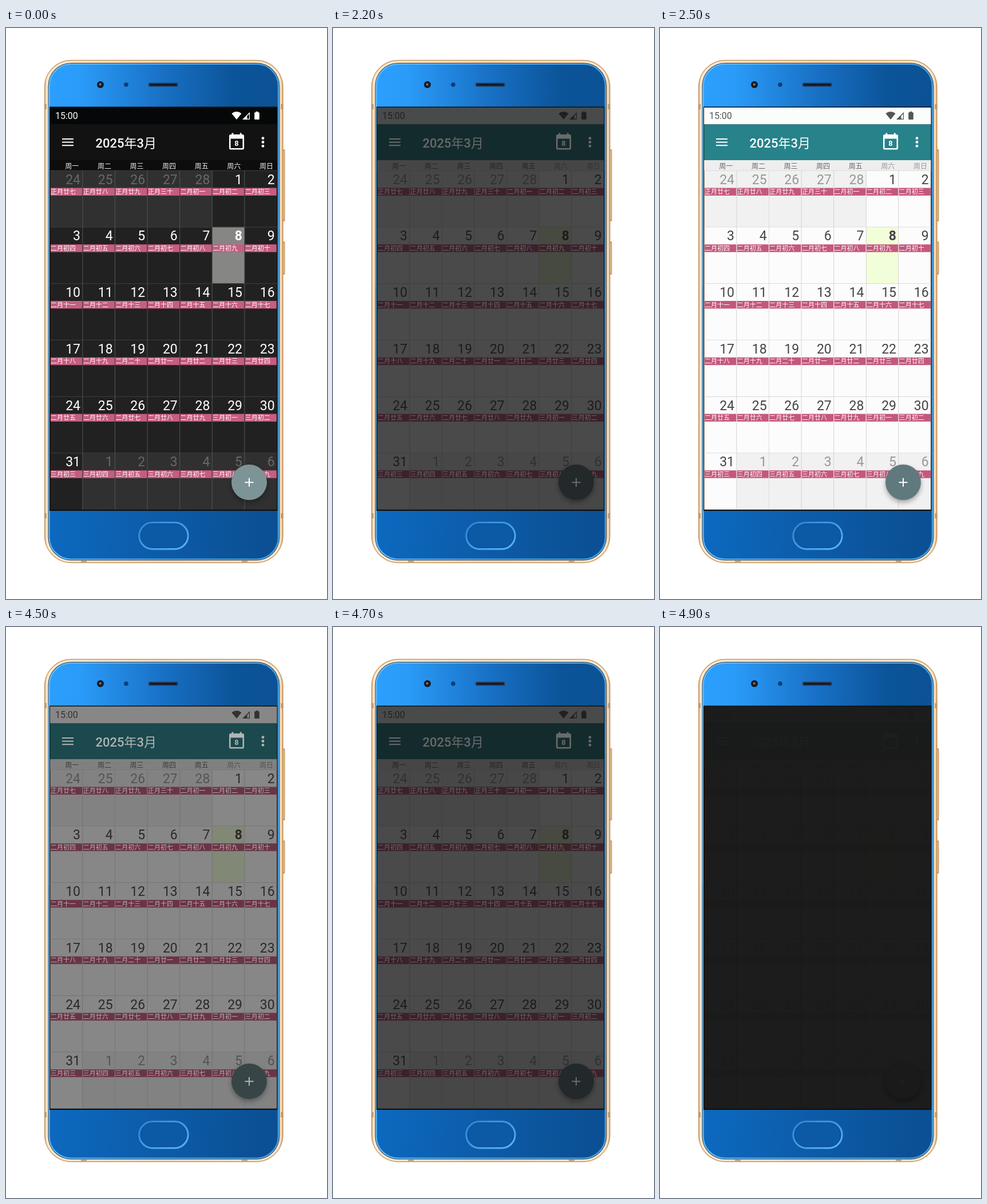
Recreate the animation shown at these times as an HTML page. Size 561x998 px, loop 5000 ms.

```html
<!DOCTYPE html>
<html lang="zh-CN">
<head>
<meta charset="utf-8">
<title>日历主题</title>
<style>
html, body { margin: 0; width: 100%; height: 100%; overflow: hidden; background: #fff; }
svg { display: block; width: 561px; height: 998px; font-family: Roboto, "Noto Sans CJK SC", "Noto Sans CJK", sans-serif; }
</style>
</head>
<body>
<svg id="stage" viewBox="0 0 561 998">
  <defs>
    <linearGradient id="gold" x1="0" x2="1">
      <stop offset="0" stop-color="#d3a46e"/><stop offset=".012" stop-color="#f6e3c6"/>
      <stop offset=".5" stop-color="#e3bd8d"/>
      <stop offset=".98" stop-color="#f3dcbb"/><stop offset="1" stop-color="#cfa06c"/>
    </linearGradient>
    <linearGradient id="top" x1="0" x2="1">
      <stop offset="0" stop-color="#2c9fff"/><stop offset=".14" stop-color="#2a9bf8"/>
      <stop offset=".5" stop-color="#1870c4"/><stop offset=".8" stop-color="#0b5499"/>
      <stop offset="1" stop-color="#0c5194"/>
    </linearGradient>
    <linearGradient id="chin" x1="0" x2="1" y1="0" y2=".1">
      <stop offset="0" stop-color="#0c6cc4"/><stop offset=".5" stop-color="#0d5dab"/>
      <stop offset="1" stop-color="#0b5094"/>
    </linearGradient>
    <linearGradient id="rim" x1="0" x2="1">
      <stop offset="0" stop-color="#68c0ff"/><stop offset=".5" stop-color="#52b0f5"/>
      <stop offset="1" stop-color="#4aa9ee"/>
    </linearGradient>
    <linearGradient id="ring" x1="0" y1="0" x2="1" y2="1">
      <stop offset="0" stop-color="#2b83d2"/><stop offset=".5" stop-color="#3f9be6"/>
      <stop offset="1" stop-color="#56b4fa"/>
    </linearGradient>
    <filter id="soft" x="-30%" y="-30%" width="160%" height="160%"><feGaussianBlur stdDeviation="4"/></filter>
    <clipPath id="body"><rect x="74.5" y="62" width="402.500" height="867.500" rx="39"/></clipPath>
    <clipPath id="view"><rect x="77" y="139" width="396.500" height="703.500"/></clipPath>
  </defs>
</svg>
<script>
const NS = 'http://www.w3.org/2000/svg';
const stage = document.getElementById('stage');

// [night, day]
const palette = {
  bar: ['#050808', '#fbfcfc'], status: ['#ffffff', '#555555'],
  head: ['#121212', '#27828a'], week: ['#0d0d0d', '#eeeeee'],
  weekday: ['#eeeeee', '#666666'], weekend: ['#eeeeee', '#999999'],
  cell: ['#212121', '#fcfcfc'], away: ['#303030', '#f1f1f1'], today: ['#868684', '#f2fed9'],
  ink: ['#ffffff', '#454545'], faint: ['#686868', '#989898'],
  line: ['#565656', '#dcdcdc'], row: ['#404040', '#e2e2e2'],
  band: ['#c65d82', '#c4587c'], fab: ['#7d9497', '#60797d'], white: ['#ffffff', '#ffffff']
};

function add(tag, attrs, parent = stage, text) {
  const el = document.createElementNS(NS, tag);
  for (const k in attrs) el.setAttribute(k, attrs[k]);
  if (text !== undefined) el.textContent = text;
  parent.appendChild(el);
  return el;
}
const paint = name => `var(--${name})`;
const rect = (x, y, width, height, fill, parent, more) =>
  add('rect', { x, y, width, height, fill, ...more }, parent);
const circle = (cx, cy, r, fill, parent, more) => add('circle', { cx, cy, r, fill, ...more }, parent);
const path = (d, fill, parent, more) => add('path', { d, fill, ...more }, parent);
const label = (text, x, y, size, fill, parent, more) =>
  add('text', { x, y, 'font-size': size, fill, ...more }, parent, text);

function drawPhone() {
  for (const [y, h] of [[212, 126], [373, 58]]) {
    rect(483, y, 4.5, h, '#c99d6b', stage, { rx: 1.5 });
    rect(484, y + 3, 1.5, h - 6, '#ecd1aa');
  }
  rect(67.500, 56.5, 416.500, 878, 'url(#gold)', stage, { rx: 47, stroke: '#c99a65', 'stroke-width': 1.3 });
  rect(70.5, 59, 410.500, 873, 'none', stage, { rx: 44, stroke: '#fbeedb', 'stroke-width': 1.6 });
  for (const y of [133, 848]) {
    rect(66.800, y, 4, 9, '#bd9a74');
    rect(480.500, y, 4, 9, '#bd9a74');
  }
  for (const x of [131, 412]) rect(x, 931, 10, 3.5, '#c5a47d');
  rect(73.5, 61, 404.500, 869.500, '#344656', stage, { rx: 40 });

  const body = add('g', { 'clip-path': 'url(#body)' });
  rect(74, 62, 404, 390, 'url(#top)', body);
  rect(74, 452, 404, 480, 'url(#chin)', body);
  rect(75.5, 63, 400.500, 865.500, 'none', body, { rx: 38, stroke: 'url(#rim)', 'stroke-width': 2.2 });

  circle(165, 99, 6, '#0d1926');
  circle(165, 99, 3.2, '#3a2a2b');
  circle(164.500, 98.5, 1.3, '#b5a6a0');
  circle(210, 99, 3.8, '#0b3c78');
  rect(249, 95.8, 51.5, 6.6, '#2a3b58', stage, { rx: 1.6 });
  rect(251, 97.500, 47.5, 3.500, '#141a26', stage, { rx: 1 });

  rect(233, 864.500, 85, 46, '#0c59a6', stage, { rx: 23, stroke: 'url(#ring)', 'stroke-width': 3.4 });
  rect(235, 866.500, 81, 42, 'none', stage, { rx: 21, stroke: '#0a4786', 'stroke-width': 1 });
  rect(76, 137.500, 398.500, 706.500, '#111', stage);
}

function drawHeader(g) {
  rect(77, 139, 397, 29.5, paint('bar'), g);
  label('15:00', 86, 158.500, 16, paint('status'), g);
  path('M403 160 L394.500 149.500 A12.500 12.500 0 0 1 411.500 149.500Z', paint('status'), g);
  path('M413 160 L426 147 V160Z M421.500 153.500 V158.800 H424.800 V150.200Z', paint('status'), g, { 'fill-rule': 'evenodd' });
  path('M436.500 146 h4 v1.500 h1.500 q.8 0 .8 .8 V159.200 q0 .8 -.8 .8 H435 q-.8 0 -.8 -.8 V148.300 q0 -.8 .8 -.8 h1.500Z', paint('status'), g);

  const white = paint('white');
  rect(77, 168.500, 397, 62.5, paint('head'), g);
  for (const y of [193, 198.600, 204.200]) rect(98, y, 20, 2, white, g);
  label('2025年3月', 156.500, 209, 22, white, g, { 'font-weight': 500 });
  rect(391.3, 187.300, 23.500, 24, 'none', g, { rx: 1.8, stroke: white, 'stroke-width': 2.600 });
  rect(390.500, 187, 25, 6.500, white, g);
  for (const x of [394.500, 408.800]) rect(x, 183.500, 2.800, 4.500, white, g);
  label('8', 403, 205.800, 13, white, g, { 'font-weight': 700, 'text-anchor': 'middle' });
  for (const y of [192.700, 199.500, 206.300]) circle(449, y, 2.4, white, g);
}

const digits = '一二三四五六七八九十';
function lunarName(n) {
  // n counts from the first day of the first lunar month
  let month = 0;
  for (const length of [30, 29]) if (n > length) { n -= length; month++; } else break;
  const unit = digits[(n - 1) % 10];
  const day = n === 20 ? '二十' : n === 30 ? '三十' : '初十廿'[n <= 10 ? 0 : n < 20 ? 1 : 2] + unit;
  return '正二三'[month] + '月' + day;
}

function drawMonth(g) {
  const x0 = 77.3, y0 = 249.2, w = 56.6, h = 98.75;
  rect(77, 231, 397, 18.5, paint('week'), g);
  for (let i = 0; i < 7; i++)
    label('周' + '一二三四五六日'[i], 127.300 + w * i, 245.500, 12, paint(i > 4 ? 'weekend' : 'weekday'), g, { 'text-anchor': 'end' });

  for (let i = 0; i < 42; i++) {
    const x = x0 + (i % 7) * w, y = y0 + Math.floor(i / 7) * h;
    const day = i - 4, inMonth = day > 0 && day <= 31, today = day === 8;
    const number = day < 1 ? day + 28 : day > 31 ? day - 31 : day;
    rect(x, y, w, h, paint(today ? 'today' : inMonth ? 'cell' : 'away'), g);
    label(number, x + 52.700, y + 23.5, 23, paint(inMonth ? 'ink' : 'faint'), g,
      { 'text-anchor': 'end', 'font-weight': today ? 700 : 400 });
  }
  for (let r = 0; r < 6; r++) rect(77, y0 + r * h - .5, 397, 1, paint('row'), g);
  for (let c = 1; c < 7; c++) rect(x0 + c * w - .5, y0, 1, 6 * h, paint('line'), g);
  for (let i = 0; i < 42; i++) {
    const x = x0 + (i % 7) * w, y = y0 + Math.floor(i / 7) * h;
    rect(x + .7, y + 30.300, w - 1.400, 13.400, paint('band'), g);
    label(lunarName(27 + i), x + .8, y + 41, 11, paint('white'), g, { 'font-weight': 500 });
  }
}

function drawButton(g) {
  circle(425, 798, 31, '#000', g, { opacity: .32, filter: 'url(#soft)' });
  circle(425, 794, 31, paint('fab'), g);
  rect(417.500, 793.200, 15, 2, paint('white'), g);
  rect(424, 786.700, 2, 15, paint('white'), g);
}

drawPhone();
const view = add('g', { 'clip-path': 'url(#view)' });
drawHeader(view);
drawMonth(view);
drawButton(view);

// [visibility, shade level of the dimmed screen]
const dim = [[.012, 25], [.13, 18], [.25, 14], [.38, 14], [.51, 14]];

function mix(hex, amount, shade) {
  const rgb = [1, 3, 5].map(i => Math.round(shade + (parseInt(hex.slice(i, i + 2), 16) - shade) * amount));
  return `rgb(${rgb})`;
}

function stateAt(ms) {
  const t = ms % 5000;
  if (t < 2000) return { theme: 0, step: 5 };
  if (t < 2500) return { theme: 1, step: Math.floor((t - 2000) / 100) };
  if (t < 4500) return { theme: 1, step: 5 };
  return { theme: 1, step: 4 - Math.floor((t - 4500) / 100) };
}

let shown = '';
function update(ms) {
  const { theme, step } = stateAt(ms);
  const key = theme + ':' + step;
  if (key === shown) return;
  shown = key;
  const [level, shade] = dim[step] || [1, 0];
  for (const name in palette) {
    // white marks fade more slowly than the page
    const amount = name === 'white' ? level * (1.7 - .7 * level) : level;
    stage.style.setProperty('--' + name, mix(palette[name][theme], amount, shade));
  }
}

const start = performance.now();
function tick() {
  update(performance.now() - start);
  requestAnimationFrame(tick);
}
tick();
</script>
</body>
</html>
```
